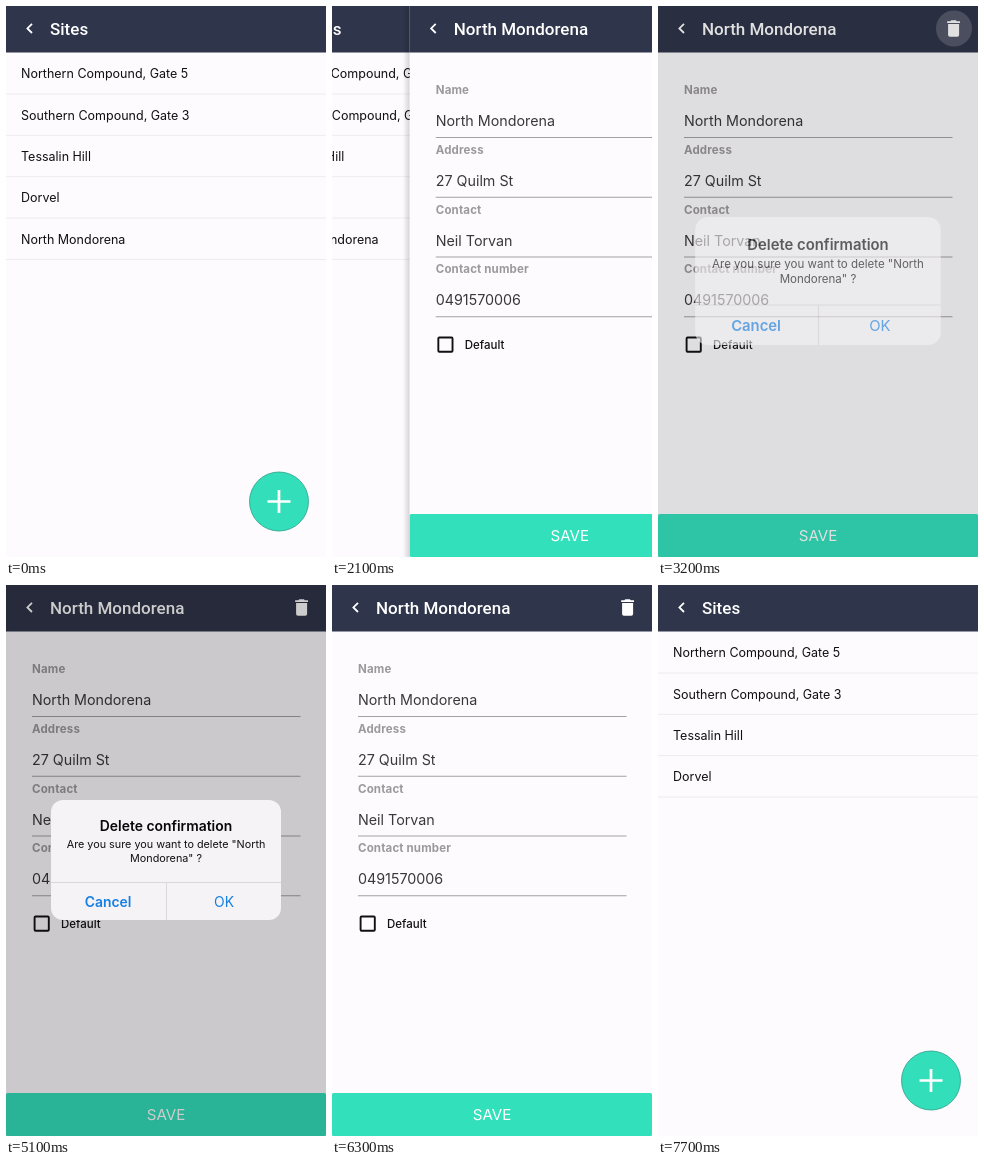
Recreate the animation shown at these times as an HTML page. Size 320 by 551 pixels, loop 7.8 s.

```html
<!DOCTYPE html>
<html lang="en">
<head>
<meta charset="utf-8">
<title>Delete a site</title>
<style>
  html, body { margin: 0; height: 100%; overflow: hidden; background: #fdfbfe; }
  svg { display: block; width: 100vw; height: 100vh; font-family: Inter, Roboto, sans-serif; }
  .title { font: 500 17px Roboto, Inter, sans-serif; fill: #fff; }
  .row { font-size: 12.5px; fill: #111; }
  .label { font-size: 11.5px; font-weight: 700; letter-spacing: .15px; fill: #9b999c; }
  .value { font-size: 14.3px; fill: #39383a; }
  .mid { text-anchor: middle; }
  .save { font-size: 15.1px; fill: #fff; }
  .head { font-size: 13.9px; font-weight: 600; fill: #080808; }
  .msg { font-size: 10.8px; fill: #111; }
  .action { font-size: 13.9px; fill: #157fe3; }
  .bold { font-weight: 600; }
</style>
</head>
<body>
<svg viewBox="0 0 320 551">
  <defs>
    <linearGradient id="shade">
      <stop offset="0" stop-color="#000" stop-opacity="0"/>
      <stop offset="1" stop-color="#000" stop-opacity=".16"/>
    </linearGradient>
    <g id="bar">
      <rect width="320" height="46.5" fill="#2f354a"/>
      <path d="M26 17.8L21.4 22.4 26 27" fill="none" stroke="#fff" stroke-width="1.8"/>
    </g>
  </defs>
  <g id="list">
    <rect width="320" height="551" fill="#fdfbfe"/>
    <use href="#bar"/>
    <text class="title" x="44" y="29">Sites</text>
    <g id="rows"></g>
    <circle cx="273" cy="495.5" r="29.5" fill="#33dfba" stroke="#2b9f89" stroke-width=".8"/>
    <path d="M261.5 495.5h23M273 484v23" stroke="#fff" stroke-width="2.7"/>
  </g>
  <g id="form">
    <rect x="-7" width="7" height="551" fill="url(#shade)"/>
    <rect width="320" height="551" fill="#fdfbfe"/>
    <use href="#bar"/>
    <text class="title" id="name" x="44" y="29"></text>
    <circle id="press" cx="296" cy="22.5" r="18" fill="#fff" fill-opacity=".18"/>
    <path transform="translate(284.6 11.5) scale(.917)" fill="#fff"
      d="M6 19q0 2 2 2h8q2 0 2-2V7H6zM19 4h-3.5l-1-1h-5l-1 1H5v2h14z"/>
    <g id="fields"></g>
    <rect x="28.6" y="331.5" width="14.2" height="14.2" rx="1" fill="none" stroke="#111" stroke-width="1.9"/>
    <text x="55" y="342.5" font-size="11.5" font-weight="500" fill="#111">Default</text>
    <rect y="508" width="320" height="43" rx="1.5" fill="#33e0bc"/>
    <text class="save mid" x="160" y="535">SAVE</text>
  </g>
  <rect id="dim" width="320" height="551"/>
  <g id="alert">
    <rect x="45" y="215" width="230" height="120" rx="12" fill="#f5f3f5"/>
    <path d="M45 297.5h230M160.5 297.5V335" stroke="#d3d1d5" stroke-width=".8"/>
    <text class="head mid" x="160" y="246">Delete confirmation</text>
    <text class="msg mid" x="160" y="263">Are you sure you want to delete "North</text>
    <text class="msg mid" x="160" y="276.5">Mondorena" ?</text>
    <text class="action bold mid" x="102" y="321.5">Cancel</text>
    <text class="action mid" x="218" y="321.5">OK</text>
  </g>
</svg>
<script>
const $ = id => document.getElementById(id);
const set = (id, name, value) => $(id).setAttribute(name, value);

const site = 'North Mondorena';
const sites = ['Northern Compound, Gate 5', 'Southern Compound, Gate 3', 'Tessalin Hill', 'Dorvel', site];
const fields = [['Name', site], ['Address', '27 Quilm St'], ['Contact', 'Neil Torvan'], ['Contact number', '0491570006']];

$('name').textContent = site;
$('rows').innerHTML = sites.map((s, i) => `<g transform="translate(0 ${i * 41.35})">
  <text class="row" x="15" y="72.3">${s}</text>
  <path d="M0 88h320" stroke="#eeecf0"/></g>`).join('');
$('fields').innerHTML = fields.map(([label, value], i) => `<g transform="translate(26 ${i * 59.75})">
  <text class="label" y="88">${label}</text>
  <text class="value" y="120">${value}</text>
  <path d="M0 131.5h268.5" stroke="#a3a1a5"/></g>`).join('');

const clamp = v => Math.min(1, Math.max(0, v));
const curve = (s, a, b) => 3 * (1 - s) ** 2 * s * a + 3 * (1 - s) * s * s * b + s ** 3;

// cubic-bezier(.36, .66, .04, 1), solved by bisection
function ease(x) {
  if (x <= 0 || x >= 1) return clamp(x);
  let lo = 0, hi = 1;
  for (let i = 0; i < 24; i++) {
    const s = (lo + hi) / 2;
    if (curve(s, .36, .04) < x) lo = s; else hi = s;
  }
  return curve(lo, .66, 1);
}

const settle = ms => ms <= 0 ? 0 : 1 - Math.exp(-ms * .0092);

function draw(t) {
  const open = ease((t - 1960) / 500) - ease((t - 6590) / 500);
  set('form', 'transform', `translate(${320 * (1 - open)})`);
  set('form', 'visibility', open > 0 ? 'visible' : 'hidden');
  set('list', 'transform', `translate(${-96 * open})`);
  $('rows').lastElementChild.setAttribute('visibility', t < 6500 ? 'inherit' : 'hidden');
  set('press', 'opacity', t < 3100 ? 0 : clamp((3400 - t) / 200));

  // The alert shrinks in, but only fades out.
  const shown = settle(t - 3100), alpha = shown * (1 - settle(t - 5700));
  const scale = 1 + .17 * (1 - shown);
  set('dim', 'opacity', t < 6300 ? alpha * .2 : 0);
  set('alert', 'opacity', t < 6300 ? alpha : 0);
  set('alert', 'transform', `translate(160 275) scale(${scale}) translate(-160 -275)`);
}

const start = performance.now();
function tick() {
  const t = (performance.now() - start) % 7800;
  draw(Math.floor(t / 100) * 100);
  requestAnimationFrame(tick);
}
tick();
</script>
</body>
</html>
```
